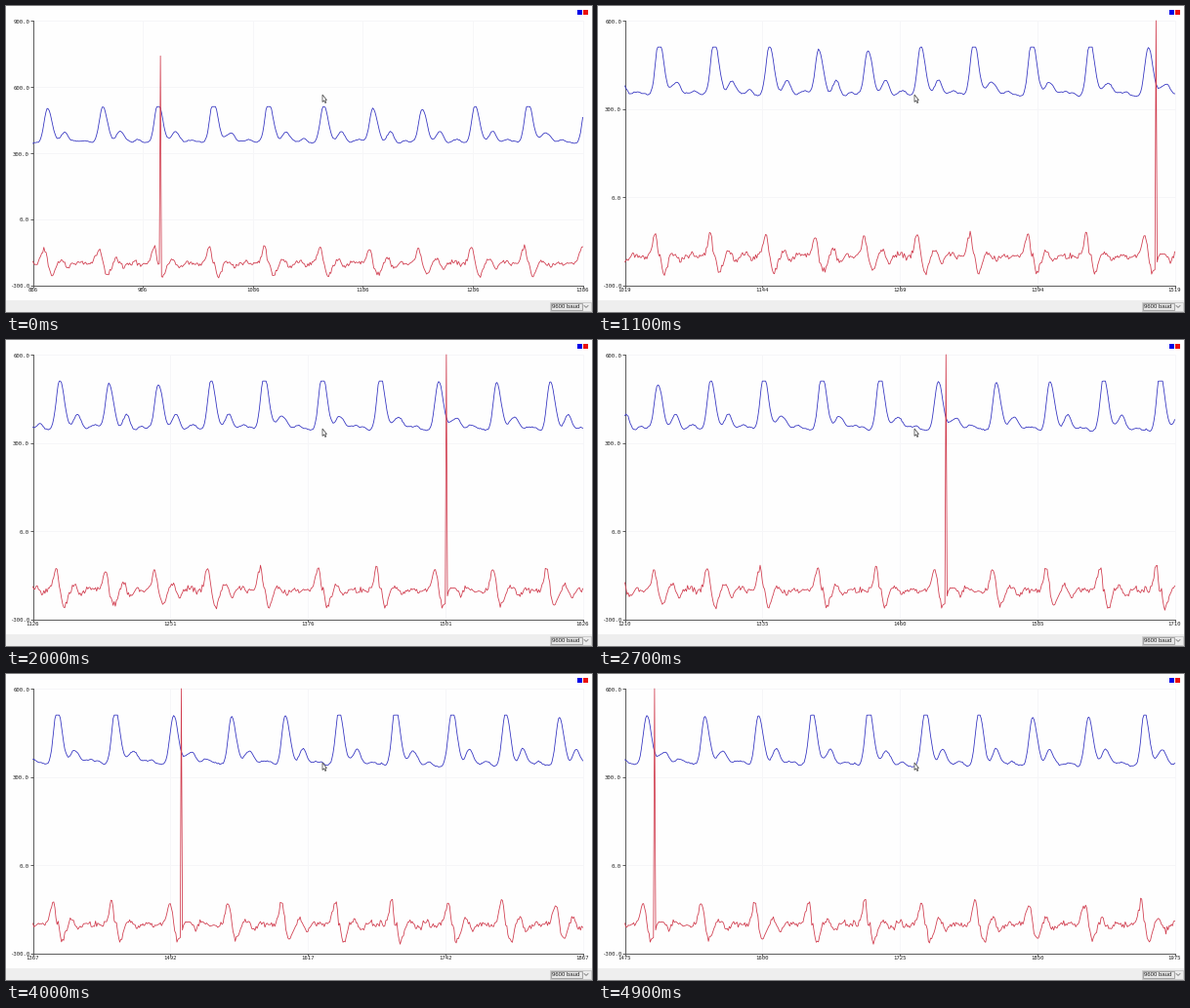
Recreate the animation shown at these times as a matplotlib script. Size 600 by 314 pixels, loop 5 s.

```python
import numpy as np
import matplotlib.pyplot as plt
from matplotlib.animation import FuncAnimation
from matplotlib.collections import LineCollection
from matplotlib.patches import Polygon, Rectangle

W, H, DPI = 600, 314, 100
FRAMES, INTERVAL = 50, 100
LEFT, RIGHT, TOP, BOTTOM = 27.5, 590.5, 15, 286.5
SPAN, FIRST, LAST = 500, 840, 1990
PX = 72 / DPI  # points per pixel
SPIKES = {1002: 740, 1502: 600}
AXIS, INK = "#4c4c4c", "#222222"


def bump(d, sigma):
    return np.exp(-d ** 2 / (2 * sigma ** 2))


def make_signals():
    """Pulse wave with a drifting beat rate, and its noisy slope."""
    rng = np.random.default_rng(4)
    s = np.arange(FIRST, LAST)
    base = np.interp(s, [1500, 1700], [345, 336])
    pulse = base + np.convolve(rng.normal(0, 5, s.size), np.ones(4) / 4, "same")

    beats = np.arange(22)
    positions = np.interp(
        beats, [0, 5, 7, 9, 13, 15, 17, 19, 21],
        [899.3, 1150.5, 1240, 1336.3, 1547.7, 1645.4, 1748.2, 1845.6, 1947.5])
    peaks = 521 - 21 * np.cos(2 * np.pi * beats / 6.5)  # breathing
    stretch = np.gradient(positions) - 50
    for pos, peak, slow in zip(positions, peaks, stretch):
        d = s - pos
        level = np.interp(pos, s, base)
        pulse += (peak - level) * bump(d, np.where(d < 0, 3.1, 4.1))
        pulse += (393 - 1.5 * slow - level) * bump(d - 16, 3.6 + 0.15 * slow)
        pulse += 14 * bump(d - 31, 4)
    pulse = np.minimum(pulse, 510)

    slope = -200 + 2.2 * np.gradient(pulse) + rng.normal(0, 5, s.size)
    for at, value in SPIKES.items():
        slope[at - FIRST] = value
    return pulse, slope


def window_start(t):
    return int(np.interp(t, [0, 1100, 2000, 4400, 4900],
                         [886, 1019, 1126, 1416, 1475]))


pulse, slope = make_signals()

fig = plt.figure(figsize=(W / DPI, H / DPI), dpi=DPI, facecolor="white")
ax = fig.add_axes([0, 0, 1, 1])
ax.set_xlim(0, W)
ax.set_ylim(H, 0)
ax.axis("off")


def box(x0, y0, x1, y1, face, edge="none", z=5):
    ax.add_patch(Rectangle((x0, y0), x1 - x0, y1 - y0, fc=face, ec=edge,
                           lw=0.8 * PX, zorder=z))


def label(ha):
    return ax.text(0, 0, "", family="DejaVu Sans Mono", size=5.6 * PX,
                   color=INK, ha=ha, va="center_baseline", zorder=4)


# plot frame
box(0, 0, W, 302, "#fefefe", z=0)
box(0, 302, W, H, "#eeeeee", z=0)
grid = LineCollection([], colors="#f6f6f8", linewidths=PX, zorder=1)
ticks = LineCollection([], colors=AXIS, linewidths=0.9 * PX, zorder=2)
ax.add_collection(grid)
ax.add_collection(ticks)
ax.plot([LEFT, LEFT, RIGHT], [TOP, BOTTOM, BOTTOM], color=AXIS,
        lw=0.9 * PX, zorder=2)
x_labels = [label("center") for _ in range(6)]
y_labels = [label("right") for _ in range(5)]
blue_line, = ax.plot([], [], color="#3030c0", lw=0.8 * PX, zorder=3)
red_line, = ax.plot([], [], color="#d03a4c", lw=0.8 * PX, zorder=3)

# legend
box(585, 4, 590, 9, "#0000e8")
box(591, 4, 596, 9, "#ea1010")

# speed selector
box(556.5, 303.5, 598.5, 312.5, "#ececec", "#c4c4c4")
box(557.5, 304.5, 589.5, 311.5, "#e6e6e6", "#949494", 6)
ax.text(559, 308.2, "9600 baud", family="Liberation Sans", size=6 * PX,
        color=INK, va="center", zorder=7)
ax.plot([592, 594, 596], [307.5, 309.4, 307.5], color="#777777",
        lw=0.8 * PX, zorder=7)

# mouse pointer
pointer = [(324, 91), (324, 98.5), (325.6, 97), (326.8, 99.5), (327.8, 99),
           (326.8, 96.7), (328.4, 96.5)]
ax.add_patch(Polygon(pointer, fc="white", ec="#505050", lw=0.8 * PX, zorder=8))


def place(labels, points, strings):
    for text in labels:
        text.set_text("")
    for text, point, string in zip(labels, points, strings):
        text.set_position(point)
        text.set_text(string)


def update(frame):
    start = window_start(frame * INTERVAL)
    # the value axis shrinks once the tall spike has left the window
    rows = 4 if start <= 1002 else 3
    top_value = 300 * (rows - 1)

    def to_y(value):
        return TOP + (top_value - value) * (BOTTOM - TOP) / (300 * rows)

    xs = np.linspace(LEFT, RIGHT, rows + 2)
    ys = np.linspace(BOTTOM, TOP, rows + 1)
    grid.set_segments([[(x, TOP), (x, BOTTOM)] for x in xs[1:]]
                      + [[(LEFT, y), (RIGHT, y)] for y in ys[1:]])
    ticks.set_segments([[(x, BOTTOM), (x, BOTTOM + 2)] for x in xs]
                       + [[(LEFT - 2.5, y), (LEFT, y)] for y in ys])
    place(x_labels, [(x, 291.3) for x in xs],
          [str(start + i * SPAN // (rows + 1)) for i in range(len(xs))])
    place(y_labels, [(24, y + 0.8) for y in ys],
          [f"{300 * (i - 1):.1f}" for i in range(len(ys))])

    px = np.linspace(LEFT, RIGHT, SPAN + 1)
    view = slice(start - FIRST, start - FIRST + SPAN + 1)
    blue_line.set_data(px, to_y(pulse[view]))
    red_line.set_data(px, to_y(slope[view]))
    return [grid, ticks, blue_line, red_line, *x_labels, *y_labels]


anim = FuncAnimation(fig, update, frames=FRAMES, interval=INTERVAL,
                     repeat=True, repeat_delay=0)
plt.show()
```
